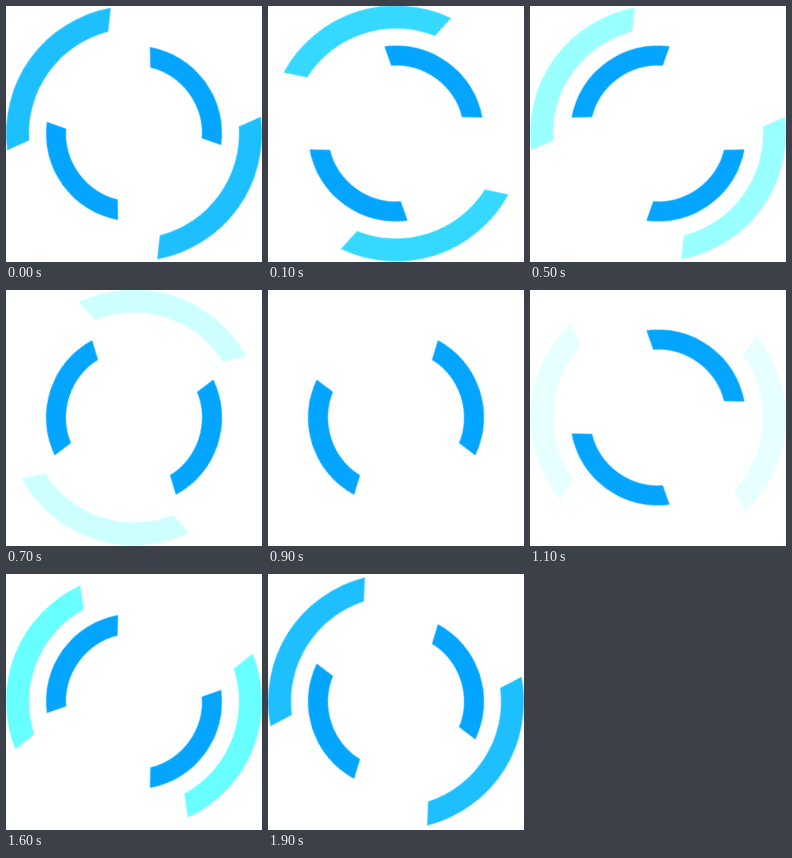
These frames come from a looping animation (256x256 px, 2 s). An HTML page without scripts:

```html
<!DOCTYPE html>
<html lang="en">
<head>
<meta charset="utf-8">
<title>Loading rings</title>
<style>
  html, body {
    margin: 0;
    width: 100%;
    height: 100%;
    overflow: hidden;
    background: #fff;
  }
  svg {
    display: block;
    width: 100%;
    height: 100%;
  }

  /* Everything advances in 100 ms ticks */
  .inner {
    fill: #03a5ff;
    animation: turn 2s steps(20) infinite;
  }
  .outer {
    animation: swing 2s steps(10) infinite, fade 2s infinite, tint 2s steps(3) infinite;
  }

  @keyframes turn {
    from { transform: rotate(54deg); }
    to { transform: rotate(-306deg); }
  }

  /* Fast full turn while fading out, slow drift while fading in */
  @keyframes swing {
    0% { transform: rotate(-54deg); }
    49.99% { transform: rotate(306deg); }
    50% { transform: rotate(-90deg); }
    100% { transform: rotate(-54deg); }
  }
  @keyframes fade {
    0% { opacity: .9; animation-timing-function: steps(9); }
    45% { opacity: 0; }
    50% { opacity: 0; animation-timing-function: steps(10); }
    100% { opacity: 1; }
  }
  @keyframes tint {
    0%, 95%, 100% { fill: rgb(3, 184, 255); }
    15%, 80% { fill: rgb(1, 255, 255); }
  }
</style>
</head>
<body>
<svg viewBox="-128 -127.5 256 256">
  <defs>
    <path id="wide" d="M-88.1-92.8A128 128 0 0 1 88.1-92.8L67.2-80.7A105 105 0 0 0-67.2-80.7Z"/>
    <path id="small" d="M-60.6-63.8A88 88 0 0 1 60.6-63.8L43.7-52.1A68 68 0 0 0-43.7-52.1Z"/>
  </defs>
  <g class="outer">
    <use href="#wide"/>
    <use href="#wide" transform="rotate(180)"/>
  </g>
  <g class="inner">
    <use href="#small"/>
    <use href="#small" transform="rotate(180)"/>
  </g>
</svg>
</body>
</html>
```
